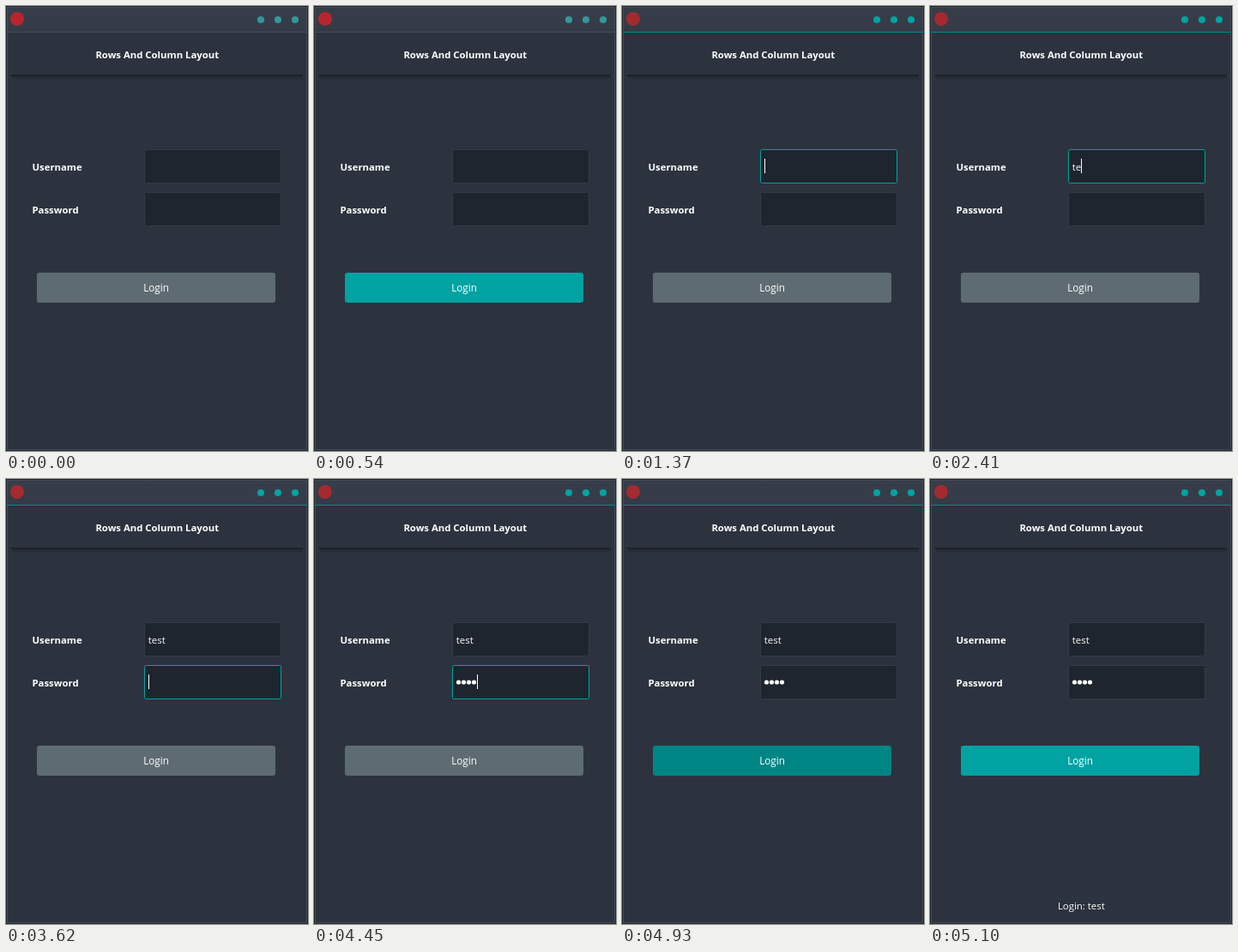
Write an HTML page that moves like this. It is 352 by 519 pixels and loops after 5.98 s.

```html
<!DOCTYPE html>
<html lang="en">
<head>
<meta charset="utf-8">
<title>Login form</title>
<style>
  html, body { margin: 0; width: 100%; height: 100%; overflow: hidden; background: #2c333e; }
  svg { display: block; width: 352px; height: 519px; }
  text { font: 400 11.4px "Open Sans", "Noto Sans", sans-serif; fill: #fff; }
  .bold { font-weight: 700; font-size: 11.35px; }
  .middle { text-anchor: middle; }
  .field { fill: #1f252e; }
</style>
</head>
<body>
<svg viewBox="0 0 352 519">
  <defs>
    <linearGradient id="bar" x2="0" y2="1">
      <stop stop-color="#373e49"/><stop offset="1" stop-color="#343b46"/>
    </linearGradient>
    <linearGradient id="shade" x2="0" y2="1">
      <stop stop-color="#12161c" stop-opacity=".75"/>
      <stop offset=".4" stop-color="#12161c" stop-opacity=".3"/>
      <stop offset="1" stop-color="#12161c" stop-opacity="0"/>
    </linearGradient>
  </defs>
  <rect width="352" height="519" fill="#20262e"/>
  <rect x="1.5" y="1.5" width="349" height="516" fill="#2c333e" stroke="#454c57"/>
  <rect x="2" y="2" width="348" height="28" fill="url(#bar)"/>
  <rect id="barLine" x="1" y="30" width="350" height="1"/>
  <circle id="icon" cx="13" cy="15" r="8"/>
  <g id="windowDots">
    <circle cx="297" cy="16" r="4.1"/>
    <circle cx="317" cy="16" r="4.1"/>
    <circle cx="337" cy="16" r="4.1"/>
  </g>
  <path d="M5 80H346V87H10Z" fill="url(#shade)"/>
  <text class="bold middle" x="176.3" y="61">Rows And Column Layout</text>
  <text class="bold" x="30.5" y="192">Username</text>
  <text class="bold" x="30.5" y="242">Password</text>
  <rect id="userBox" class="field" x="161.5" y="167.5" width="159" height="39" rx="2"/>
  <rect id="passBox" class="field" x="161.5" y="217.5" width="159" height="39" rx="2"/>
  <text id="userText" x="165.8" y="192"></text>
  <g id="bullets" fill="#fff">
    <circle cx="168.5" cy="237" r="2.6"/>
    <circle cx="174.5" cy="237" r="2.6"/>
    <circle cx="180.5" cy="237" r="2.6"/>
    <circle cx="186.5" cy="237" r="2.6"/>
  </g>
  <rect id="caret" width="1" height="17" fill="#fff"/>
  <rect id="button" x="36" y="311" width="278" height="35" rx="3"/>
  <text class="middle" x="175" y="333" style="font-size:11.7px">Login</text>
  <text id="result" class="middle" x="176.3" y="502">Login: test</text>
</svg>
<script>
  const LOOP = 5980;
  const TEAL = '#00a2a2', GREY = '#5f6b72', PRESSED = '#008585', EDGE = '#343b46';
  const USER_KEYS = [2210, 2410, 2620, 2720];
  const PASS_KEYS = [3870, 3970, 4220, 4450];
  const USER_CARET = [166, 170, 176, 181, 185];

  const $ = id => document.getElementById(id);
  const set = (el, attrs) => {
    for (const name in attrs) el.setAttribute(name, attrs[name]);
  };
  const show = (el, on) => set(el, { visibility: on ? 'visible' : 'hidden' });
  const within = (t, from, to) => t >= from && t < to;
  const typed = (keys, t) => keys.filter(k => t >= k).length;

  function buttonColor(t) {
    if (within(t, 4930, 5100)) return PRESSED;
    return within(t, 540, 610) || t >= 4620 ? TEAL : GREY;
  }

  function render(t) {
    const active = t >= 1370;
    const inUser = within(t, 1370, 3620);
    const inPass = within(t, 3620, 4930);
    const userCount = typed(USER_KEYS, t);
    const passCount = typed(PASS_KEYS, t);
    const blink = within(t, 1840, 2210) || within(t, 3220, 3620);

    set($('barLine'), { fill: active ? '#078a8b' : '#454c57' });
    set($('icon'), { fill: active ? '#a52a30' : '#b8262d' });
    set($('windowDots'), { fill: active ? TEAL : '#349798' });
    set($('userBox'), { stroke: inUser ? TEAL : EDGE });
    set($('passBox'), { stroke: inPass ? TEAL : EDGE });
    set($('button'), { fill: buttonColor(t) });

    $('userText').textContent = 'test'.slice(0, userCount);
    [...$('bullets').children].forEach((dot, i) => show(dot, i < passCount));
    set($('caret'), {
      x: inUser ? USER_CARET[userCount] : 166 + 6 * passCount,
      y: inUser ? 178 : 228
    });
    show($('caret'), (inUser || inPass) && !blink);
    show($('result'), t >= 5100);
  }

  const start = performance.now();
  function tick() {
    render((performance.now() - start) % LOOP);
    requestAnimationFrame(tick);
  }
  tick();
</script>
</body>
</html>
```
